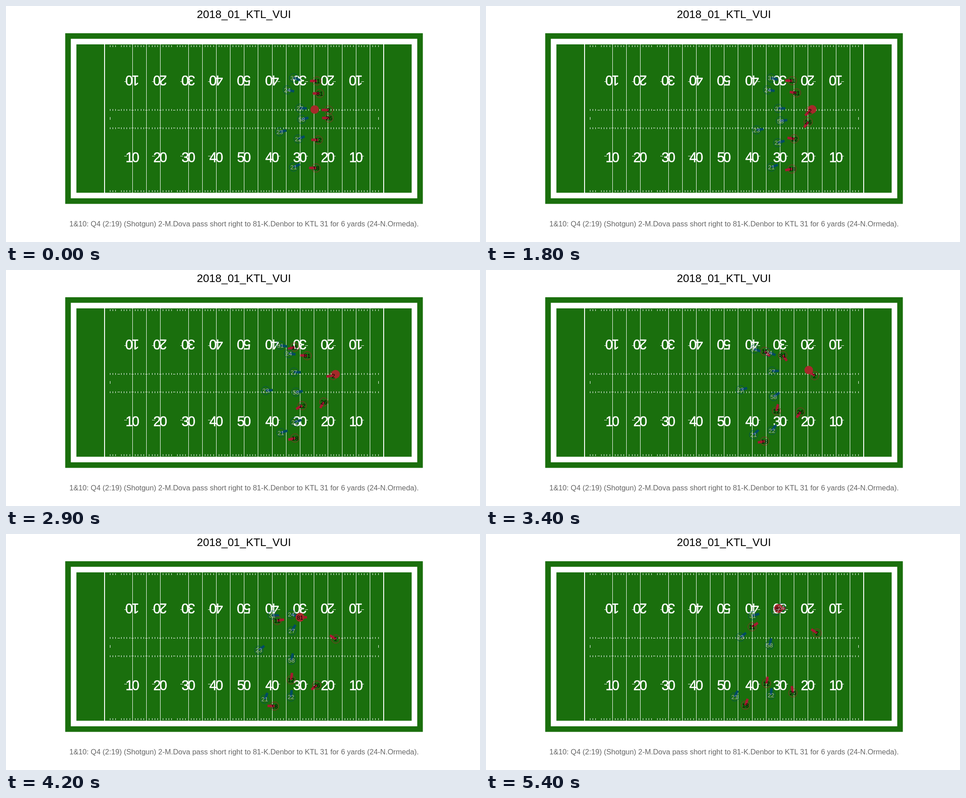
An HTML page for the animation above (5500 ms loop, 1058 px wide and 529 px high).

```html
<!DOCTYPE html>
<html lang="en">
<head>
<meta charset="utf-8">
<title>Play tracking</title>
<style>
  html, body { margin: 0; width: 100%; height: 100%; overflow: hidden; background: #fff; }
  svg { display: block; width: 100vw; height: 100vh; font-family: "Liberation Sans", Arial, sans-serif; }
  text { text-anchor: middle; }
</style>
</head>
<body>
<svg viewBox="0 0 1058 529">
  <text x="531" y="27" font-size="24.7">2018_01_KTL_VUI</text>
  <text x="531.4" y="494" font-size="16.44" fill="#666">1&amp;10: Q4 (2:19) (Shotgun) 2-M.Dova pass short right to 81-K.Denbor to KTL 31 for 6 yards (24-N.Ormeda).</text>
  <g id="turf"></g>
  <g id="lines" shape-rendering="crispEdges"></g>
  <g id="digits" fill="#fff" stroke="#fff" stroke-width="0.5" font-size="30.5" letter-spacing="-3"></g>
  <g id="noses"></g>
  <g id="rings"></g>
  <circle id="ball" r="9.6" fill="#a52a2a"/>
  <g id="labels"></g>
</svg>
<script>
const LOOP = 5500, STEP = 100;
const YARD = 6.236, LEFT = 157.15, TOP = 86, WIDTH = 120 * YARD, HEIGHT = 160 / 3 * YARD;
const GREEN = '#1a6f0d', WHITE = '#fff';
const $ = id => document.getElementById(id);

function add(id, tag, attrs, label) {
  const el = document.createElementNS('http://www.w3.org/2000/svg', tag);
  for (const k in attrs) el.setAttribute(k, attrs[k]);
  if (label !== undefined) el.textContent = label;
  $(id).appendChild(el);
  return el;
}

const rect = (id, x, y, width, height, fill = WHITE) => add(id, 'rect', { x, y, width, height, fill });
const yardX = yard => Math.round(LEFT + YARD * yard);

function drawField() {
  [GREEN, WHITE, GREEN].forEach((fill, i) => {
    const pad = (2 - i) * 2 * YARD;
    rect('turf', LEFT - pad, TOP - pad, WIDTH + 2 * pad, HEIGHT + 2 * pad, fill);
  });

  const unlined = [15, 35];
  for (let yard = 10; yard <= 110; yard += 5) {
    const goal = yard % 100 === 10;
    if (!unlined.includes(yard)) rect('lines', yardX(yard) - goal, TOP, goal ? 2 : 1, 333);
  }
  for (let yard = 12; yard <= 108; yard++) {
    const x = yardX(yard);
    if (yard % 5) [88, 231, 272, 413].forEach(y => rect('lines', x, y, 1, 4));
    else [233, 273].forEach(y => rect('lines', x - 2, y, 5, 1));
  }
  [12, 108].forEach(yard => rect('lines', yardX(yard), 249, 1, 6));

  for (let yard = 20; yard <= 100; yard += 10) {
    const x = yardX(yard), side = Math.sign(yard - 60), n = 50 - Math.abs(60 - yard);
    add('digits', 'text', { x: x - 1.2, y: 349.7 }, n);
    add('digits', 'text', { transform: `translate(${x + 1.2} 156) rotate(180)` }, n);
    if (side) [169, 336].forEach(y => rect('lines', x + side * 15 - 3, y, 6, 1));
  }
}

const clamp = v => Math.min(1, Math.max(0, v));
const mix = (a, b, u) => a + (b - a) * u;
const ease = u => u * u * (3 - 2 * u);
const span = (t, from, to) => clamp((t - from) / (to - from));
const angle = (dx, dy) => Math.atan2(dy, dx) * 180 / Math.PI;
const turnTo = (a, b) => ((b - a + 900) % 360) - 180;

const SNAP = 1200, BREAK = 2300, THROW = 3250, CATCH = 3950;
const TIMES = [SNAP, BREAK, 3800, LOOP - STEP];

// Monotone cubic through the route points, starting from rest
function glide(vs, t) {
  const last = TIMES.length - 1;
  const slope = i => (vs[i + 1] - vs[i]) / (TIMES[i + 1] - TIMES[i]);
  const tangent = i => {
    if (i === 0) return 0;
    if (i === last) return slope(last - 1);
    const a = slope(i - 1), b = slope(i);
    return a * b <= 0 ? 0 : 2 * a * b / (a + b);
  };
  if (t <= SNAP) return vs[0];
  if (t >= TIMES[last]) return vs[last];
  const i = TIMES.findIndex(next => t < next) - 1;
  const h = TIMES[i + 1] - TIMES[i], u = (t - TIMES[i]) / h, w = 1 - u;
  return mix(vs[i], vs[i + 1], ease(u)) + h * u * w * (tangent(i) * w - tangent(i + 1) * u);
}

// Attackers face where they run, defenders stay square; both then turn to the ball
const OFFENSE = {
  line: '#a71930', text: '#000', heed: 0,
  stance: (at, t) => {
    const a = at(t - 50), b = at(t + 50);
    return angle((b.x - a.x) * 10 - 12, (b.y - a.y) * 10);
  }
};
const DEFENSE = { line: '#004c63', text: '#a5acaf', heed: 0.35, stance: () => 0 };
const players = [];

function player(number, team, route, lookAt = 3100) {
  const xs = route.map(p => p[0]), ys = route.map(p => p[1]);
  const at = t => ({ x: glide(xs, t), y: glide(ys, t) });
  const nose = add('noses', 'path', { d: 'M0 0H15.5', stroke: team.line, 'stroke-width': 5.5 });
  const ring = add('rings', 'circle', { r: 9.5, fill: 'none', stroke: team.line, 'stroke-width': 0.9 });
  const label = add('labels', 'text', { y: 5, 'font-size': 13.2, fill: team.text }, number);

  function show(t, ball) {
    const p = at(t), stance = team.stance(at, t);
    const heed = mix(team.heed, 1, ease(span(t, lookAt, lookAt + 400)));
    const heading = stance + heed * turnTo(stance, angle(ball.x - p.x, ball.y - p.y));
    const place = `translate(${p.x.toFixed(2)} ${p.y.toFixed(2)})`;
    nose.setAttribute('transform', `${place} rotate(${heading.toFixed(1)})`);
    ring.setAttribute('transform', place);
    label.setAttribute('transform', place);
  }
  players.push(show);
  return at;
}

drawField();

const passer = player(2, OFFENSE, [[720, 233], [727, 236], [735, 237], [739, 222]]);
const catcher = player(81, OFFENSE, [[700, 196], [684, 193], [658, 190], [653, 167]]);
player(11, OFFENSE, [[694, 168], [668, 167], [611, 189], [594, 208]]);
player(12, OFFENSE, [[697, 300], [676, 296], [641, 323], [626, 335]]);
player(18, OFFENSE, [[692, 363], [669, 369], [608, 386], [579, 384]], 4800);
player(26, OFFENSE, [[721, 251], [716, 273], [697, 331], [685, 356]], 4600);

player(21, DEFENSE, [[642, 361], [629, 361], [586, 371], [555, 365]]);
player(22, DEFENSE, [[652, 298], [650, 319], [636, 366], [636, 361]]);
player(23, DEFENSE, [[611, 282], [594, 273], [564, 266], [568, 231]]);
player(24, DEFENSE, [[628, 188], [630, 188], [633, 183], [659, 165]]);
player(27, DEFENSE, [[656, 229], [648, 230], [637, 224], [647, 173]]);
player(31, DEFENSE, [[642, 161], [628, 162], [594, 181], [595, 183]]);
player(58, DEFENSE, [[660, 254], [653, 263], [639, 287], [633, 249]]);

const SPOT = { x: 689, y: 232 };
const between = (a, b, u) => ({ x: mix(a.x, b.x, u), y: mix(a.y, b.y, u) });

// Snapped to the passer, carried, thrown straight to the catcher
function ballAt(t) {
  const hand = passer(Math.min(t, THROW));
  const held = { x: hand.x + 5, y: hand.y - 3 };
  if (t < THROW) return between(SPOT, held, span(t, SNAP - 100, SNAP + 300));
  return between(held, catcher(Math.max(t, CATCH)), span(t, THROW, CATCH));
}

function show(t) {
  const ball = ballAt(t);
  $('ball').setAttribute('cx', ball.x);
  $('ball').setAttribute('cy', ball.y);
  players.forEach(draw => draw(t, ball));
}

const start = performance.now();
function tick() {
  const t = (performance.now() - start) % LOOP;
  show(Math.floor(t / STEP) * STEP);
  requestAnimationFrame(tick);
}
tick();
</script>
</body>
</html>
```
